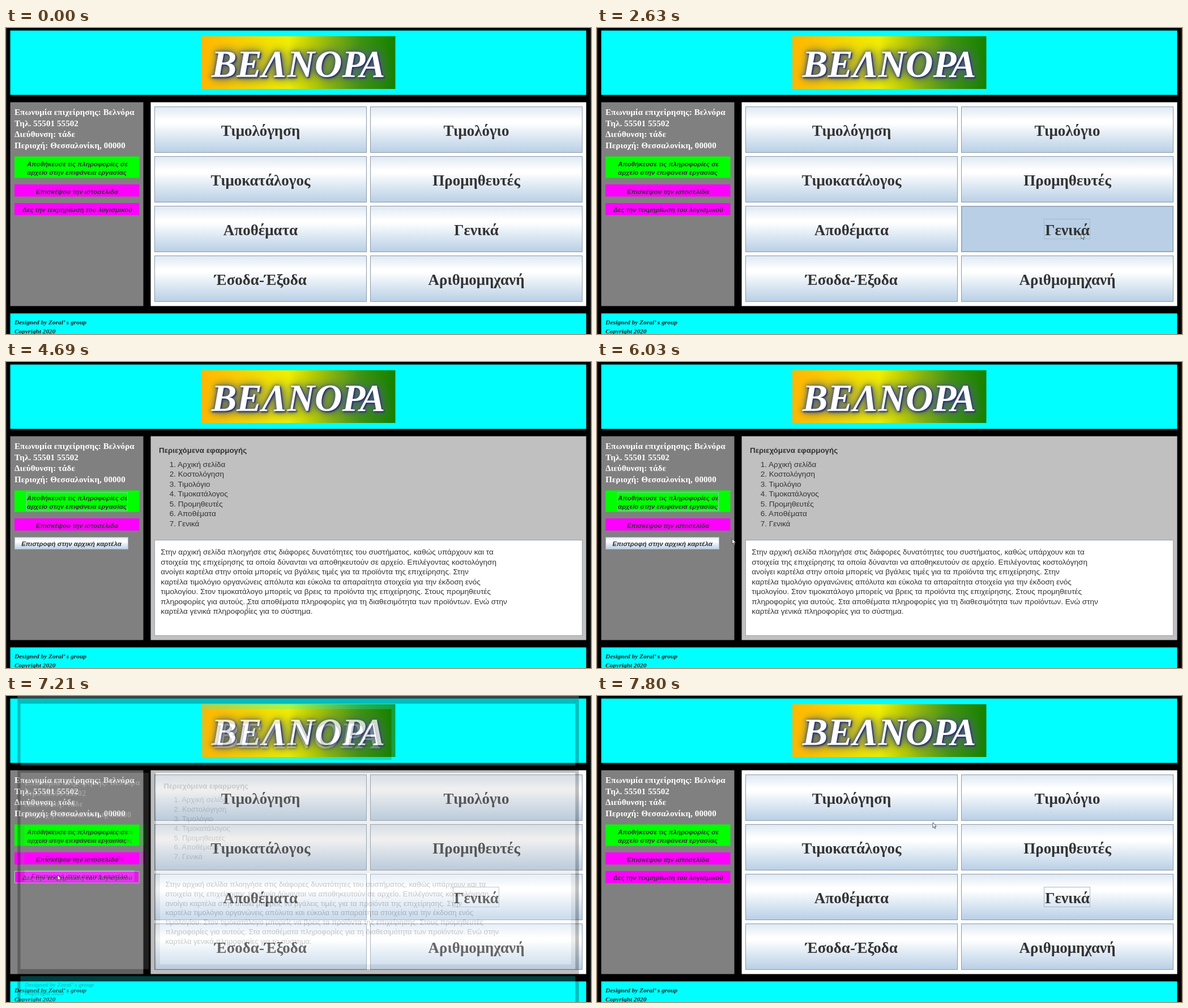
Write an HTML page that moves like this. It is 1033 px wide and 542 px high and loops after 8000 ms.

```html
<!DOCTYPE html>
<html lang="el">
<head>
<meta charset="utf-8">
<style>
  html, body { margin: 0; width: 100%; height: 100%; overflow: hidden; background: #000; }
  svg { display: block; width: 100vw; height: 100vh; }
  text { white-space: pre; fill: #333; }
  .serif { font: bold 15px "Liberation Serif", serif; letter-spacing: .1px; fill: #fff; }
  .big { font: bold 27px "Liberation Serif", serif; text-anchor: middle; }
  .small { font: italic bold 11.5px "Liberation Sans", sans-serif; }
  .mid { text-anchor: middle; }
  .foot { font: italic bold 11.4px "Liberation Serif", serif; fill: #222; }
  .body { font: 13.53px "Liberation Sans", sans-serif; }
  .head { font: bold 13.4px "Liberation Sans", sans-serif; }
  .bar { font: 10.5px "Liberation Sans", sans-serif; }
  .title { font: italic bold 67px "Liberation Serif", serif; fill: #fff; text-anchor: middle;
    filter: drop-shadow(2px 2px 1px #2b3566) drop-shadow(-1px 0 3px #46507c) drop-shadow(3px 0 9px #4a6470); }
</style>
</head>
<body>
<svg id="stage" viewBox="0 0 1033 542" preserveAspectRatio="none"></svg>
<script>
const LOOP = 8000;
const $ = id => document.getElementById(id);
const rect = (x, y, w, h, fill, more = '') =>
  `<rect x="${x}" y="${y}" width="${w}" height="${h}" fill="${fill}" ${more}/>`;
const text = (x, y, cls, s) => `<text x="${x}" y="${y}" class="${cls}">${s}</text>`;
const outline = (x, y, w, h, color, id = '') =>
  rect(x + .5, y + .5, w - 1, h - 1, 'none', `stroke="${color}" id="${id}"`);

// Everything that can be hovered: one list per window
const hot = { home: [], info: [] };

function button(win, x, y, w, h, fill, label, border) {
  const id = win + hot[win].length;
  const inset = border ? 1 : 0;
  hot[win].push({ id, x, y, w, h });
  return rect(x, y, w, h, fill, `id="${id}"`) +
    (border ? outline(x, y, w, h, border) : '') +
    outline(x + inset, y + inset, w - 2 * inset, h - 2 * inset, border ? '#a3b8cc' : '#b8cfe5', id + 'over') +
    label;
}

function common(win) {
  return rect(2, -35, 1029, 612, '#000') +
    rect(7.5, 4.5, 1017, 114, '#0ff') +
    rect(345, 14.5, 342.5, 93.5, 'url(#banner)') +
    text(516, 86, 'title', 'ΒΕΛΝΟΡΑ') +
    rect(7.5, 131.5, 235, 361, '#808080') +
    ['Επωνυμία επιχείρησης: Βελνόρα', 'Τηλ. 55501 55502', 'Διεύθυνση: τάδε', 'Περιοχή: Θεσσαλονίκη, 00000']
      .map((s, i) => text(15, 154 + i * 19.7, 'serif', s)).join('') +
    button(win, 15, 227.5, 220.5, 38, '#0f0',
      text(37, 245, 'small', 'Αποθήκευσε τις πληροφορίες σε') +
      text(37, 260, 'small', 'αρχείο στην επιφάνεια εργασίας')) +
    button(win, 15, 277, 220.5, 21.5, '#f0f', text(125.5, 293.5, 'small mid', 'Επισκέψου την ιστοσελίδα')) +
    rect(7.5, 505.5, 1017, 71, '#0ff') +
    text(15, 525, 'foot', 'Designed by Zoral’ s group') +
    text(15, 540.5, 'foot', 'Copyright 2020');
}

const menu = ['Τιμολόγηση', 'Τιμολόγιο', 'Τιμοκατάλογος', 'Προμηθευτές',
  'Αποθέματα', 'Γενικά', 'Έσοδα-Έξοδα', 'Αριθμομηχανή'];

const home = common('home') +
  button('home', 15, 310, 220.5, 21.5, '#f0f', text(126, 326, 'small mid', 'Δες την τεκμηρίωση του λογισμικού')) +
  rect(255.5, 131.5, 769, 361, '#fff') +
  menu.map((s, i) => {
    const x = 262 + i % 2 * 381, y = 139 + (i >> 1) * 88;
    return button('home', x, y, 375, 82, 'url(#ocean)', text(x + 187.5, y + 52, 'big', s), '#8a98a8');
  }).join('') +
  outline(789, 338, 82, 36, '#a3b8cc', 'focusMenu');

const topics = ['Αρχική σελίδα', 'Κοστολόγηση', 'Τιμολόγιο', 'Τιμοκατάλογος', 'Προμηθευτές', 'Αποθέματα', 'Γενικά'];
const story = [
  'Στην αρχική σελίδα πλοηγήσε στις διάφορες δυνατότητες του συστήματος, καθώς υπάρχουν και τα',
  'στοιχεία της επιχείρησης τα οποία δύνανται να αποθηκευτούν σε αρχείο. Επιλέγοντας κοστολόγηση',
  'ανοίγει καρτέλα στην οποία μπορείς να βγάλεις τιμές για τα προϊόντα της επιχείρησης. Στην',
  'καρτέλα τιμολόγιο οργανώνεις απόλυτα και εύκολα τα απαραίτητα στοιχεία για την έκδοση ενός',
  'τιμολογίου. Στον τιμοκατάλογο μπορείς να βρεις τα προϊόντα της επιχείρησης. Στους προμηθευτές',
  'πληροφορίες για αυτούς. Στα αποθέματα πληροφορίες για τη διαθεσιμότητα των προϊόντων. Ενώ στην',
  'καρτέλα γενικά πληροφορίες για το σύστημα.'];

const info = common('info') +
  rect(2, -35, 1029, 30, '#fff') + text(19, -11, 'bar', 'Βελνόρα') +
  outline(36, 231, 179, 33, '#a3b8cc', 'focusSave') +
  button('info', 15, 310, 201, 22, 'url(#ocean)',
    text(115.5, 325.5, 'small mid', 'Επιστροφή στην αρχική καρτέλα'), '#a9b9c9') +
  rect(255.5, 131.5, 769, 361, '#c0c0c0') +
  text(270, 160.5, 'head', 'Περιεχόμενα εφαρμογής') +
  topics.map((s, i) => text(288.7, 185.5 + i * 17.55, 'body', `${i + 1}. ${s}`)).join('') +
  rect(262, 315, 756, 170, '#fff') + outline(262, 315, 756, 170, '#98a4b0') +
  story.map((s, i) => text(273.3, 341 + i * 17.55, 'body', s)).join('');

const stops = list => list.map(([o, c]) => `<stop offset="${o}" stop-color="${c}"/>`).join('');

$('stage').innerHTML = `<defs>
  <linearGradient id="ocean" x2="0" y2="1">${stops([[0, '#dde8f3'], [.3, '#fff'], [.36, '#fff'], [.65, '#dde8f3'], [1, '#b8cfe5']])}</linearGradient>
  <linearGradient id="banner">${stops([[0, '#ffb800'], [.12, '#ffc400'], [.3, '#f5dc00'], [.45, '#f2ee00'], [.56, '#c0d000'], [.7, '#7aac10'], [.82, '#3f9410'], [1, '#168000']])}</linearGradient>
  </defs>` +
  rect(0, 0, 1033, 542, '#1c1c1c') +
  `<g>${home}</g><g id="info">${info}</g>
  <g id="cursor">
    <path id="arrow" d="M0 0V9.4L2.1 7.4L3.6 10.7L5 10.1L3.6 6.9H6.3Z" fill="#fff" stroke="#333" stroke-width=".8"/>
    <path id="beam" d="M-2 -5H-.6M.6 -5H2M0 -4.6V4.6M-2 5H-.6M.6 5H2" fill="none" stroke="#555" stroke-width=".9"/>
  </g>`;

// Pointer path: time, x, y
const path = [
  [1050, 1027, 534], [1500, 865, 394], [1530, 865, 394], [1780, 910, 321],
  [2140, 910, 321], [2460, 855, 364], [3070, 855, 364], [3260, 618, 312],
  [3590, 618, 312], [3720, 490, 290], [3850, 377, 305], [4260, 377, 305],
  [4690, 426, 433], [5480, 426, 433], [5540, 424, 432], [5700, 424, 432],
  [6100, 200, 288], [6500, 89, 318], [6540, 89, 318], [6640, 91, 317],
  [7600, 91, 317], [7800, 593, 224], [LOOP, 593, 224]];

function pointer(t) {
  const i = Math.max(1, path.findIndex(k => k[0] > t));
  const [t0, x0, y0] = path[i - 1], [t1, x1, y1] = path[i];
  const p = Math.max(0, (t - t0) / (t1 - t0));
  return [x0 + (x1 - x0) * p, y0 + (y1 - y0) * p];
}

const clamp = v => Math.min(1, Math.max(0, v));
const show = (id, on) => $(id).setAttribute('visibility', on ? 'visible' : 'hidden');
const inside = (b, x, y) => x >= b.x && x < b.x + b.w && y >= b.y && y < b.y + b.h;

function draw(t) {
  const [x, y] = pointer(t);
  const moved = t >= 1050;
  const active = t >= 2790 && t < 7180 ? 'info' : 'home';

  for (const win in hot)
    for (const b of hot[win])
      show(b.id + 'over', moved && win === active && inside(b, x, y));

  // Pressed buttons and keyboard focus
  $('home8').setAttribute('fill', t >= 2630 && t < 2740 ? '#b8cfe5' : 'url(#ocean)');
  $('info2').setAttribute('fill', t >= 6810 ? '#b8cfe5' : 'url(#ocean)');
  show('focusMenu', t >= 2630);
  show('focusSave', t < 6810);

  // The second window grows in, then shrinks away
  const open = clamp((t - 2780) / 150), close = clamp((t - 7170) / 140);
  const scale = 1 - .1 * (1 - open) ** 3 - .125 * close;
  const alpha = open * (1 - close) ** 4;
  $('info').setAttribute('transform', `translate(500 253) scale(${scale}) translate(-500 -253)`);
  $('info').setAttribute('opacity', alpha);
  $('info').setAttribute('display', alpha > 0 ? 'inline' : 'none');

  const typing = active === 'info' && open === 1 && inside({ x: 262, y: 315, w: 756, h: 170 }, x, y);
  $('cursor').setAttribute('transform', `translate(${x} ${y})`);
  show('arrow', moved && !typing);
  show('beam', moved && typing);
}

const start = performance.now();
function tick() {
  draw((performance.now() - start) % LOOP);
  requestAnimationFrame(tick);
}
tick();
</script>
</body>
</html>
```
